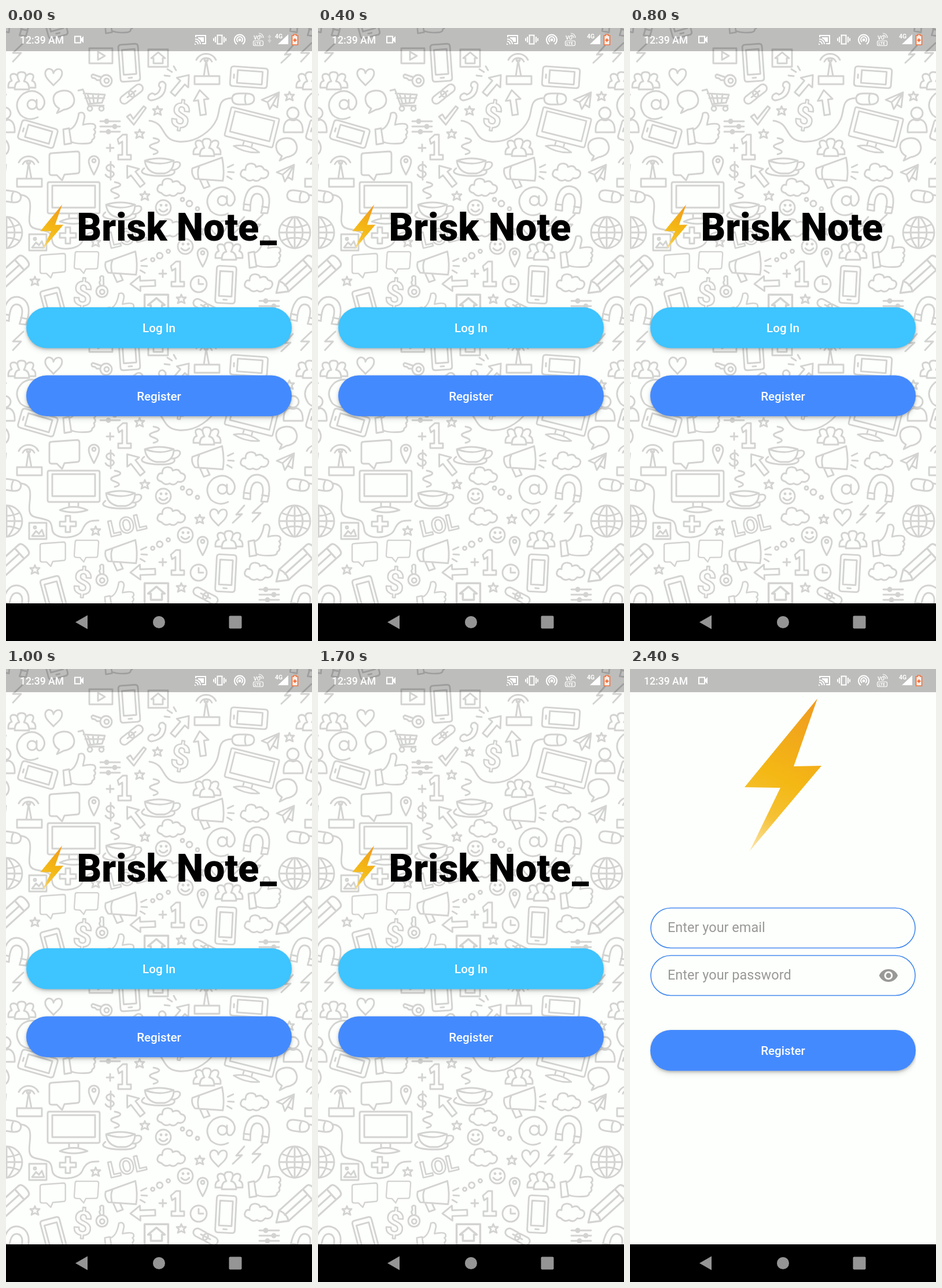
Animation of 529 by 1058 pixels, one loop 5500 ms. Source, as an HTML page:

```html
<!DOCTYPE html>
<html lang="en">
<head>
<meta charset="utf-8">
<title>Chat app</title>
<style>
  html, body { margin: 0; width: 100%; height: 100%; overflow: hidden; background: #000; }
  svg { display: block; width: 100vw; height: 100vh; font-family: Roboto, sans-serif; }
  #tile { fill: none; stroke: #d3d4d2; stroke-width: 2.9; stroke-linecap: round; stroke-linejoin: round; }
  #tile text { font-weight: 700; text-anchor: middle; stroke-width: 2.6; }
  .title { font-size: 66.1px; font-weight: 900; }
  .button { filter: drop-shadow(0 2px 2px #0003) drop-shadow(0 4px 4px #0002); }
  .label { font-size: 20.57px; font-weight: 500; fill: #fff; text-anchor: middle; }
  .field { fill: none; stroke: #448aef; stroke-width: 1.6; }
  .hint { font-size: 23.5px; fill: #999a97; }
  .line { fill: none; stroke: #fff; stroke-width: 2; }
  .thin { stroke-width: 1.2; }
</style>
</head>
<body>
<svg viewBox="0 0 529 1058">
  <defs>
    <linearGradient id="gold" gradientUnits="userSpaceOnUse" x1="325" y1="70" x2="200" y2="310">
      <stop offset="0" stop-color="#f09d1f"/>
      <stop offset=".5" stop-color="#f4b814"/>
      <stop offset=".75" stop-color="#f5c235"/>
      <stop offset="1" stop-color="#fce6ae"/>
    </linearGradient>
    <path id="bolt" fill="url(#gold)" d="M324 51L283 168L331 167L207 314L260 205L198 204Z"/>
    <clipPath id="body"><rect width="529" height="993"/></clipPath>
    <clipPath id="column"><rect x="35" y="610" width="459" height="110"/></clipPath>
    <g id="tile"></g>
  </defs>

  <rect width="529" height="993" fill="#fdfffc"/>

  <g id="welcome">
    <g id="wall" clip-path="url(#body)"></g>
    <use href="#bolt" transform="translate(0 289.3) scale(.3)"/>
    <text class="title" x="122.5" y="367">Brisk Note</text>
    <text class="title" id="cursor" x="439" y="367">_</text>
    <rect class="button" x="35" y="482" width="459" height="70.500" rx="35.250" fill="#3ec4ff"/>
    <text class="label" x="264.5" y="525">Log In</text>
    <rect class="button" x="35" y="599.5" width="459" height="70.500" rx="35.250" fill="#448aff"/>
    <text class="label" x="264.5" y="642.6">Register</text>
  </g>

  <g id="signup">
    <use href="#bolt"/>
    <rect class="field" x="36" y="412.5" width="457" height="69" rx="34.5"/>
    <text class="hint" x="65" y="454">Enter your email</text>
    <rect class="field" x="36" y="494.5" width="457" height="69" rx="34.5"/>
    <text class="hint" x="65" y="536">Enter your password</text>
    <path fill="#999a97" transform="translate(429.2 511.4) scale(1.469)" d="M12 4.5C7 4.5 2.7 7.6 1 12c1.7 4.4 6 7.5 11 7.5s9.3-3.1 11-7.5c-1.7-4.4-6-7.5-11-7.5zM12 17a5 5 0 0 1 0-10a5 5 0 0 1 0 10zM12 9a3 3 0 0 0 0 6a3 3 0 0 0 0-6z"/>
    <g clip-path="url(#column)">
      <rect class="button" x="35" y="623" width="459" height="70.500" rx="35.250" fill="#448aff"/>
    </g>
    <text class="label" x="264.5" y="666">Register</text>
  </g>

  <!-- status bar -->
  <rect width="529" height="40" fill="#000" opacity=".255"/>
  <g fill="#fff">
    <text x="24" y="27" font-size="17.6" font-weight="500">12:39 AM</text>
    <path class="line" d="M119 14.5h10v11h-10z"/>
    <path d="M129 19l5-5v12l-5-5z"/>
    <path class="line" d="M328 16v-3h17v14h-6M327 19a9 9 0 0 1 9 9M327 23a5 5 0 0 1 5 5"/>
    <path d="M332 16h10v8h-4q-2-5-6-6zM326 26l3 3h-3z"/>
    <path class="line" d="M365.5 12.5h8v15h-8zM362 15v10M377 15v10M359 17.5v5M380 17.5v5"/>
    <path class="line" d="M399 28a9 9 0 1 1 10 0M401 24a5 5 0 1 1 6 0"/>
    <circle cx="404" cy="20.5" r="2.4"/>
    <text x="428" y="20" font-size="9" font-weight="700">VO</text>
    <rect class="line thin" x="427.5" y="22" width="17" height="8.5" rx="2.5"/>
    <text x="429.5" y="29" font-size="7" font-weight="700">LTE</text>
    <path class="line thin" d="M437 9a8 8 0 0 1 8 8M437 12a5 5 0 0 1 5 5"/>
    <path id="traffic" opacity=".35" d="M455.5 11l3.5 5h-2v2h-3v-2h-2zM455.5 26l3.5-5h-2v-2h-3v2h-2z"/>
    <text x="465" y="18" font-size="10.5" font-weight="700">4G</text>
    <path d="M488 11v17h-18z"/>
    <path fill="#f9f1ec" stroke="#ee7442" stroke-width="1.7" d="M497.5 11h4v2h3v16h-10v-16h3z"/>
    <path stroke="#ee6a35" stroke-width="2" d="M496.5 21h6M499.5 18v6"/>
  </g>

  <!-- navigation bar -->
  <rect y="993" width="529" height="65"/>
  <g fill="#959595">
    <path d="M120 1025.5L141 1013.5V1037.5Z"/>
    <circle cx="264.5" cy="1025.5" r="10.5"/>
    <rect x="385.5" y="1014.5" width="22" height="22" rx="2"/>
  </g>
</svg>

<script>
const $ = id => document.getElementById(id);
const ring = (x, y, r) => `M${x - r} ${y}a${r} ${r} 0 1 0 ${2 * r} 0a${r} ${r} 0 1 0 ${-2 * r} 0`;

const parts = [];
const place = at => {
  const [x, y, turn = 0, size = 1] = at.split(' ');
  return `transform="translate(${x} ${y}) rotate(${turn}) scale(${size})"`;
};
// Each spot reads "x y turn size".
const draw = (d, ...spots) => spots.forEach(s => parts.push(`<path d="${d}" ${place(s)}/>`));
const write = (text, size, ...spots) =>
  spots.forEach(s => parts.push(`<text font-size="${size}" ${place(s)}>${text}</text>`));

// heart, phone, people, key
draw('M0 14C-6 7-16 0-14-9C-11-18-1-15 0-7C3-16 15-17 15-7C15 2 5 8 0 14Z', '82 85', '367 347');
draw('M-12-32h24q5 0 5 5v54q0 5-5 5h-24q-5 0-5-5v-54q0-5 5-5zM-11-23h22v43h-22zM-3 26h6',
  '213 60 -4', '420 85 94', '55 183 106', '380 443 3', '83 482 -15');
draw('M-12 15q0-13 8-14q-8-16 4-16q12 0 4 16q9 1 9 14zM-12 12h-11q-1-10 6-12q-6-11 3-12q4 0 6 3M13 12h11q1-10-6-12q6-11-3-12q-4 0-6 3',
  '27 91', '347 206', '385 385');
draw(ring(8, 3, 10) + ring(9, 3, 4) + 'M0-3L-15-8q-4 2-1 6l5 1l3 3l6 0', '165 88', '166 446 70');

// antenna, at sign, bubbles
draw('M-21 10h43v14h-43zM-5 10l4-27l5 27' + ring(-1, -18, 3) + 'M-11-15a11 11 0 0 1 20 0M-18-18a19 19 0 0 1 34 0',
  '347 73', '40 250');
draw(ring(0, 0, 8) + 'M8-8v12q2 7 8 4q10-10 2-22q-14-16-34-4q-18 16-4 36q14 12 30 4', '45 132', '374 298');
draw('M-8 15l-4 8l12-6q18-3 18-17q-2-17-19-16q-18 2-17 16q1 10 10 15z', '100 124', '485 206');
draw('M-20-23l43-3q4 0 4 5v28q0 5-4 5l-22 2l-4 10l-9-9h-9q-4 0-4-4v-30q0-4 5-4z', '100 239', '80 411 0 .84', '138 405 4 .78');

// cart, chain, handset, arrow, tick, star
draw('M-25-15l8-2l10 28h26M-16-10l37 2l-5 14l-24 2M-9-9l5 16M0-9l2 16M10-9l-2 15M-13-2h33' + ring(-5, 16, 4) + ring(15, 16, 4), '150 123');
draw('M-16-7h13a7 7 0 0 1 0 14h-13a7 7 0 0 1 0-14zM3-7h13a7 7 0 0 1 0 14h-13a7 7 0 0 1 0-14zM-9 0h18', '217 114 -38', '345 482 28');
draw('M-13 8q-4 7 4 9q26-4 25-28q-4-7-10-3q-4 6 1 9q-2 10-10 12q-4-5-10 1z', '260 108');
draw('M-5 21v-26h-8l13-17l13 17h-8v26z', '338 129 -8', '302 98 40', '223 255 -38', '237 441 -92');
draw('M-15 3l6-4l5 8l18-22l4 3l-21 29z', '224 150');
draw('M0-8l2 5h6l-4 4l2 6l-6-3l-6 3l2-6l-4-4h6z',
  '262 143', '490 118', '231 183', '240 290', '155 370', '335 350', '50 437', '303 468');

// mice with their cords
draw('M-18 0q0-9 12-9h12q14 0 14 9q0 10-14 10h-12q-12 0-12-10zM6-9q-4 9 0 19', '409 122', '6 290 8');
draw('M390 121C364 122 372 140 364 158S330 199 298 196S278 164 248 160M26 288C60 292 25 340 50 346S78 350 80 368S125 385 132 368S150 352 160 352', '0 0');

// plane, person, thumb, sliders
draw('M15-14l-30 13l10 4l4 12l5-8l8 5zM15-14l-20 17M15-14l-11 21', '457 125', '483 250');
draw(ring(0, -11, 10) + 'M-16 22q-1-19 10-22q7 3 12 0q12 3 11 22z', '496 158');
draw('M-28 2l10-2l4 26l-12 2zM-17 2q12-4 16-28q9-4 10 6l-3 14q18-4 21 1q2 5-2 7q5 5 0 9q3 6-3 9q0 5-6 6q-18 2-29-2',
  '127 173', '447 386', '196 482 0 .9');
draw('M-17-9h34M-17 0h34M-17 9h34' + ring(-6, -9, 3) + ring(8, 0, 3) + ring(-3, 9, 3), '180 170', '455 480');

// monitor, pin, cup, megaphone, cloud
draw('M-42-32h84q3 0 3 3v48q0 3-3 3h-84q-3 0-3-3v-48q0-3 3-3zM-37-26h74v38h-74zM-8 22v8M8 22v8M-24 36q24-11 48 0q-24 8-48 0z',
  '117 298', '424 176 14 .95');
draw('M0 17q-9-16-9-23a9 9 0 0 1 18 0q0 7-9 23z' + ring(0, -7, 3), '152 236', '340 395');
draw('M-27-3q24-8 50 0q0 18-16 22h-14q-18-4-20-22zM-24-2q24 8 44 0M23 0q12-3 11 5q-4 9-16 8M-28 10q-14 10 18 13q38 2 34-9M-12-14q16-4-2-10q-12-5 8-10q10-5-6-8',
  '267 232', '200 308');
draw('M-28-2l50-22q6 22 4 40h-48q-8-8-6-18zM-14 16l8 15l10-4l-6-11M-16-7q-4 8 0 22M33-8l9-5M34 0h10M33 8l8 4', '350 246 4', '200 408 4');
draw('M-17 12q-9-2-7-9q2-7 8-5q0-12 11-11q7 1 7 6q10-5 14 4q10 2 7 10q-3 7-12 5q-6 8-14 3q-8 4-14-3z',
  '430 247', '286 273', '286 343', '437 438');

// smiley, dots, magnet, globe, sparks
draw(ring(0, 0, 13) + ring(-4, -4, 1) + ring(5, -4, 1) + 'M-7 3q7 8 14 0', '272 310', '310 377');
draw(ring(-12, -5, 3) + ring(0, 2, 5) + ring(14, 11, 3), '317 301', '264 392 -60');
draw('M-21 20q-4-44 21-44q26 2 21 44l-11 1q4-32-10-32q-14 0-9 31zM-22 10h11M21 10h-11', '434 297 8', '18 488 12');
draw(ring(0, 0, 27) + 'M-27 0h54M0-27v54M-22-14q22 10 44 0M-22 14q22-10 44 0M-2-27q-24 27 0 54M2-27q24 27 0 54', '499 353');
draw('M-8-14l-14 16l10-1l-16 15M24-18l-18 17h14l-14 15', '420 340', '6 44');
draw('M-14 2l9 1M-9-9l8 5M2-14l4 7', '288 80');

// picture, plus, clock, pencil, boxes
draw('M-15-14h30v28h-30zM-10 9l7-9l5 5l5-7l4 11z' + ring(-5, -6, 2), '55 370');
draw('M-4-14h8v10h10v8h-10v10h-8v-10h-10v-8h10z', '107 358');
draw(ring(0, 0, 14) + 'M0-8v8h8', '333 442');
draw('M-40 0l16-11h50v22h-50zM-24-11q6 11 0 22M26-11h8q6 0 6 11q0 11-6 11h-8M-22 0h48', '500 428 -42 1.1');
draw('M-20-13h40v26h-40zM-5-7l12 7l-12 7z', '164 48');
draw('M-17-14h34v30h-34zM-8 10v-9h-4l12-10l12 10h-4v9z', '263 51', '260 477 0 1.2');

// lettering
write('$', 58, '299 171 8', '131 479 4');
draw('M7-7q-3-5-8-4q-7 2-5 7q2 4 7 4q7 2 5 7q-3 4-7 4q-5-1-7-5M1-16v31', '180 247');
draw('M-10-14l9-8h7v35h7v8h-22v-8h7v-23l-6 4z', '203 206', '295 425');
draw('M-6 0h12M0-6v12', '180 207', '271 424');
write('LOL', 38, '212 373 -13');

$('tile').innerHTML = parts.join('');
const period = 498;
let wall = '';
for (const x of [-period, 0, period])
  for (const y of [-period, 0, period])
    wall += `<use href="#tile" x="${x}" y="${y}"/>`;
$('wall').innerHTML = wall;

const show = (id, on) => $(id).style.display = on ? '' : 'none';
const start = performance.now();

function frame() {
  const t = (performance.now() - start) % 5500;
  show('welcome', t < 2400);
  show('signup', t >= 2400);
  show('cursor', t < 300 || t >= 1000);
  show('traffic', t < 300);
  requestAnimationFrame(frame);
}
frame();
</script>
</body>
</html>
```
